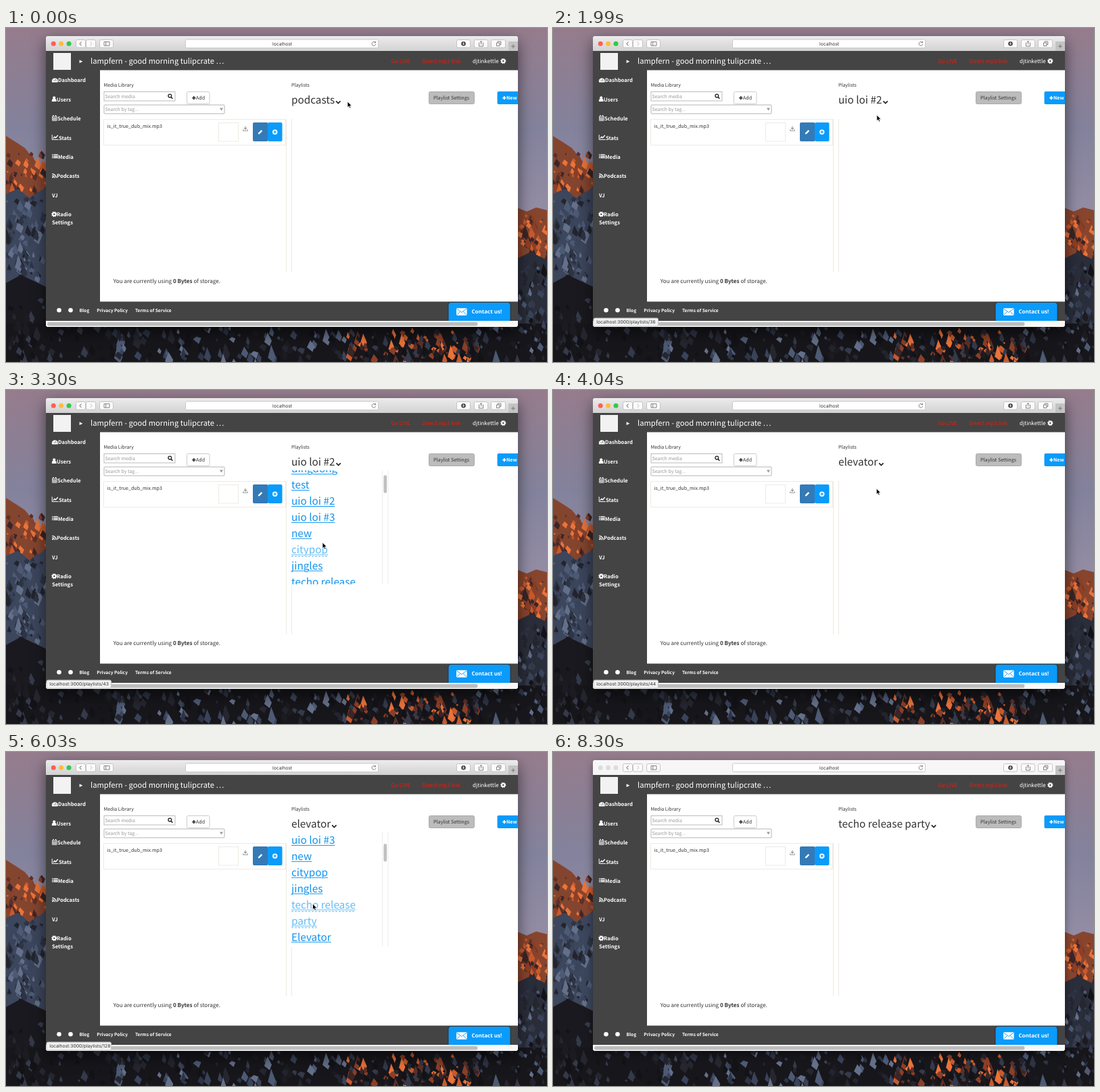
An HTML page for the animation above (8.4 s loop, 800 by 495 pixels).

```html
<!DOCTYPE html>
<html lang="en">
<head>
<meta charset="utf-8">
<title>Playlist picker</title>
<style>
html, body { margin: 0; width: 100%; height: 100%; overflow: hidden; background: #17161b; }
svg { display: block; width: 800px; height: 495px; }
text { font-family: "Noto Sans CJK JP", "Noto Sans CJK", "Noto Sans", sans-serif; text-rendering: geometricPrecision; white-space: pre; }
.ui { font-family: Inter, Roboto, sans-serif; }
.b { font-weight: 700; }
.chat { font-family: "Open Sans", sans-serif; font-weight: 700; }
</style>
</head>
<body>
<svg id="stage" viewBox="0 0 800 495" xmlns="http://www.w3.org/2000/svg"></svg>
<script>
const LOOP = 8400, ROW = 23.9, LEFT = 422, TOP = 119, BOTTOM = 288, BLUE = '#0a9bfb', DARK = '#444';
const LIGHTS = ['#fc605b', '#fdbc40', '#34c84a'];
const stage = document.getElementById('stage');

const rect = (x, y, w, h, fill, more = '') =>
  `<rect x="${x}" y="${y}" width="${w}" height="${h}" fill="${fill}" ${more}/>`;
const box = (x, y, w, h, fill, line, r = 0) =>
  rect(x + .5, y + .5, w - 1, h - 1, fill, `stroke="${line}" rx="${r}"`);
const text = (x, y, size, str, fill = '#333', cls = '') =>
  `<text x="${x}" y="${y}" font-size="${size}" fill="${fill}" class="${cls}">${str}</text>`;
const shape = (d, fill) => `<path d="${d}" fill="${fill}"/>`;
const line = (d, color, w = 1, more = '') =>
  `<path d="${d}" fill="none" stroke="${color}" stroke-width="${w}" ${more}/>`;
const dot = (x, y, r, fill, more = '') => `<circle cx="${x}" cy="${y}" r="${r}" fill="${fill}" ${more}/>`;
const plus = (x, y, color, r = 2.6) => line(`M${x - r} ${y}h${2 * r}M${x} ${y - r}v${2 * r}`, color, 1.7);
const gear = (x, y, color) =>
  dot(x, y, 2.2, 'none', `stroke="${color}" stroke-width="2"`) +
  dot(x, y, 3.4, 'none', `stroke="${color}" stroke-width="1.5" stroke-dasharray="1.34 1.33"`);

// Mountain backdrop: soft sky, flat slopes, seeded facets
let seed = 11;
const rnd = () => (seed = (seed * 16807) % 2147483647) / 2147483647;
function facets(n, x, y, w, h, colors, size) {
  let out = '';
  while (n--) {
    const s = size * (.4 + rnd()), lean = (rnd() - .3) * s;
    out += shape(`M${x + rnd() * w} ${y + rnd() * h}l${s * .4} ${lean + s * .4}l${-s * .2} ${s * .5}l${-s * .5} ${-s * .4}z`,
      colors[Math.floor(rnd() * colors.length)]);
  }
  return out;
}
const rock = ['#131217', '#1c1b21', '#25262f', '#343a4a'];
const snow = ['#4d5a74', '#64708a', '#39435a', '#23242d', '#2d3445'];
const glow = ['#c85a2c', '#ea733a', '#8c3f27', '#3a2527', '#5b3029'];
const backdrop = () =>
  rect(0, 0, 800, 495, 'url(#sky)') +
  shape('M0 160L16 170 28 178 42 196 60 208V495H0z', '#84452f') +
  facets(60, 0, 182, 60, 54, glow, 11) +
  shape('M0 246L18 238 34 252 60 236V495H0z', '#3c465c') +
  facets(90, 0, 246, 60, 120, snow, 12) +
  shape('M0 378L22 366 60 384V495H0z', '#1a191f') +
  shape('M755 266L770 272 784 266 800 270V495H755z', '#87452e') +
  facets(50, 757, 274, 45, 60, glow, 11) +
  shape('M755 342L776 332 800 344V495H755z', '#2a2e3a') +
  facets(50, 757, 340, 45, 90, [...rock, ...snow], 12) +
  rect(0, 438, 800, 57, '#17161b') +
  facets(70, 0, 400, 160, 90, rock, 13) +
  facets(120, 150, 440, 350, 50, [...rock, ...snow], 13) +
  facets(150, 505, 444, 195, 48, [...glow, ...rock], 12) +
  facets(50, 690, 430, 110, 58, [...rock, ...snow], 12);

const defs = `<defs>
<linearGradient id="sky" x2="0" y2="1"><stop stop-color="#957c8c"/><stop offset=".3" stop-color="#83829c"/>
<stop offset=".55" stop-color="#938ca4"/></linearGradient>
<linearGradient id="bar" x2="0" y2="1"><stop stop-color="#ececec"/><stop offset="1" stop-color="#d2d2d2"/></linearGradient>
<clipPath id="frame"><rect x="59" y="12" width="698" height="431" rx="4"/></clipPath>
<clipPath id="menuClip"><rect x="421" y="${TOP}" width="145" height="${BOTTOM - TOP}"/></clipPath>
</defs>`;

function toolbar() {
  const btn = (x, w) => box(x, 17, w, 12.5, '#fbfbfb', '#c4c4c4', 2);
  return rect(59, 12, 698, 22, 'url(#bar)', 'id="chrome"') +
    LIGHTS.map((c, i) => dot(70.2 + i * 11.4, 23.2, 3.5, c, 'class="light"')).join('') +
    btn(103, 15) + btn(118, 15) + btn(138, 21) + btn(666, 21) + btn(692, 21) + btn(717, 22) +
    line('M111.5 20.5l-2.5 2.8 2.5 2.8', '#555') + line('M124.5 20.5l2.5 2.8-2.5 2.8', '#bbb') +
    line('M145 20.5h8v5.6h-8zM147.7 20.5v5.6', '#666', .8) +
    dot(676.5, 23.2, 3.3, '#444') + line('M676.5 21v3.5m-1.4-1.3l1.4 1.5 1.4-1.5', '#fff', .8) +
    line('M700.5 22h-1v5h6v-5h-1M702.5 24.5v-5m-1.5 1.4l1.5-1.5 1.5 1.5', '#666', .8) +
    line('M725.5 22h4.5v4.5h-4.5zM727 21.5v-1.5h4.8v4.5h-1.4', '#666', .8) +
    box(265, 16.5, 286, 13.5, '#fff', '#c9c9c9', 2) + text(394, 25.8, 6.8, 'localhost', '#333', 'ui') +
    line('M546.2 21.5a2.9 2.9 0 1 0 .6 2.4M546.6 19.6v2.2h-2.2', '#666', .8) +
    rect(743, 20, 14, 14, '#c3c3c3') + line('M750 24.2v6M747 27.2h6', '#666', .8);
}

function header() {
  const red = '#f0190a', y = 52.2;
  return rect(59, 34, 698, 28.5, DARK) + rect(70, 37, 26, 25, '#f2f2f2') +
    shape('M108.6 47.3l4.8 2.4-4.8 2.4z', '#fff') +
    text(125, 53.2, 11.2, 'lampfern - good morning tulipcrate …', '#fff') +
    text(569.5, y, 8.05, 'Go LIVE', red) + text(615.5, y, 8.05, 'Direct mp3 link', red) +
    text(690, y, 8.05, 'djtinkettle', '#fff') + gear(735.3, 49, '#fff');
}

function sidebar() {
  const w = '#fff';
  const items = { Dashboard: 77, Users: 75, Schedule: 76, Stats: 78, Media: 77, Podcasts: 75, VJ: 68, Radio: 75 };
  return rect(59, 62, 80, 344, DARK) +
    Object.entries(items).map(([s, x], i) => text(x, 80.2 + i * 28.45, 7.65, s, w, 'b')).join('') +
    text(68, 290.6, 7.65, 'Settings', w, 'b') +
    shape('M68 80.5a4.6 4.6 0 1 1 8.6 0z', w) + line('M72 79l1.4-3.4M69.4 77.6h1m3.8 0h1', DARK, .8) +
    dot(71.2, 103.3, 2.1, w) + shape('M67.8 109v-1.6q0-2.4 2-2.4h2.8q2 0 2 2.4v1.6z', w) +
    line('M68.5 131h6.6v6.3h-6.6zM68.5 133h6.6M70.7 133v4.3M72.9 133v4.3M68.5 135.2h6.6', w, .8) + line('M70 129v2M73.6 129v2', w, 1.2) +
    line('M68.2 158.2v7.2h9.4', w) + line('M69.8 163.6l2-2.3 1.6 1.4 3.4-3.6', w, 1.4) +
    line('M68 187.6h1.4m.8 0h6.6M68 190h1.4m.8 0h6.6M68 192.3h1.4m.8 0h6.6', w, 1.4) +
    dot(69.2, 221.2, 1.1, w) + line('M68.2 218.6a3.6 3.6 0 0 1 3.6 3.6M68.2 216.2a6 6 0 0 1 6 6', w, 1.2) +
    gear(71.3, 276, w);
}

function footer() {
  const link = (x, s) => text(x, 421.2, 6.65, s, '#fff', 'b');
  return rect(59, 405.5, 698, 28.5, DARK) +
    dot(78.5, 418.3, 3.3, '#fff') + dot(95.5, 418.3, 3.3, '#fff') +
    link(108.5, 'Blog') + link(134.3, 'Privacy Policy') + link(191, 'Terms of Service') +
    rect(653, 406, 94, 32, '#222', 'rx="5" opacity=".35"') + rect(654.5, 407, 91, 30, BLUE, 'rx="4"') +
    rect(666, 415.3, 15.6, 10.6, '#fff', 'rx="1"') + line('M666.4 416l7.4 5.6 7.4-5.6M666.6 425.4l5-5m9.6 5l-5-5', BLUE, .9) +
    text(688.5, 423.4, 8, 'Contact us!', '#fff', 'chat') +
    rect(59, 434, 698, 9, '#f8f8f8') + rect(61, 436, 636.5, 5.4, '#bdbdbd', 'rx="2.7"');
}

function library() {
  const pale = '#efeae4';
  return text(144.5, 86.6, 7, 'Media Library') + text(LEFT, 86.6, 7, 'Playlists') +
    box(144.5, 94, 106, 14.5, '#fff', '#bbb') + text(146.5, 104, 7, 'Search media', '#999') +
    dot(242.3, 100.6, 2.4, 'none', 'stroke="#222" stroke-width="1.3"') + line('M244 102.4l2.4 2.4', '#222', 1.5) +
    box(267, 94, 34.5, 19, '#fff', '#ccc', 2) + plus(277.8, 103.6, '#333') + text(281, 106.2, 7.1, 'Add') +
    box(144.5, 113.5, 179, 14, '#fff', '#b4b4b4', 1) + text(146.5, 123.2, 7, 'Search by tag...', '#999') +
    shape('M316 118.4h5l-2.5 4.2z', '#999') +
    box(144, 135, 270, 39, '#fff', pale) + text(149.5, 148.4, 7.1, 'is_it_true_dub_mix.mp3') +
    box(314, 140, 30, 28.5, '#fff', pale) +
    line('M354 145.5v4.2m-2-1.8l2 2.2 2-2.2M350.8 150.2v2h6.4v-2', '#999', 1.1) +
    rect(365, 140, 22.5, 28, '#337ab7', 'rx="2"') + rect(387, 140, 21.5, 28, BLUE, 'rx="2"') +
    shape('M372.8 157.4l.5-2.2 4.2-4.2 1.7 1.7-4.2 4.2z', '#fff') +
    dot(397.7, 154.2, 3.7, '#fff') + line('M397.7 152v4.4M395.5 154.2h4.4', BLUE, 1.2) +
    line('M414.5 135v227M422.5 135v227', pale) +
    text(158.8, 377.6, 8.15, 'You are currently using <tspan class="b">0 Bytes</tspan> of storage.') +
    box(625, 94, 68, 19, '#bcbcbc', '#ababab', 2) + text(632, 106.2, 7.2, 'Playlist Settings') +
    rect(726.5, 94, 40, 19, BLUE, 'rx="2"') + plus(736.8, 103.6, '#fff') + text(740, 106.2, 7.1, 'New', '#fff', 'b');
}

// A slash marks where a long name wraps
const lists = 'podcasts,dingdong,test,uio loi #2,uio loi #3,new,citypop,jingles,techo release/party,Elevator'.split(',');
const ids = [12, 34, 35, 36, 41, 42, 43, 45, 128, 44];
const rows = lists.flatMap((name, item) => name.split('/').map(part => ({ part, item })));
const title = item => lists[item].replace('/', ' ').toLowerCase();
const baseline = i => 136.2 + i * ROW;

const menu = () => `<g id="menu">${rect(LEFT, TOP, 143.5, 170, '#fff')}
  <g clip-path="url(#menuClip)"><g id="rows">${rows.map((r, i) => `<g>
    <path class="under"/><path class="dash" stroke="#6dbdf5" stroke-dasharray="3 2"/>
    <text x="${LEFT}" y="${baseline(i)}" font-size="15.3" stroke="#fff" stroke-width="1.3" paint-order="stroke">${r.part}</text></g>`).join('')}</g></g>
  ${line('M556.5 119v169M565 119v169', '#ececec')}${rect(558.4, 120, 4.8, 26.5, '#c1c1c1', 'id="thumb" rx="2.4"')}</g>`;

const pointers =
  `<g id="arrow"><path d="M0 0V8.6L2 6.9 3.4 10 4.9 9.3 3.5 6.3H6.2z" fill="#000" stroke="#fff" stroke-width=".7"/></g>` +
  `<g id="hand"><path d="M1.2 .6q1-.9 1.7.3l.7 2.5 1-.3.9.5 1-.1.7.8.4 2.6-.7 2.6H2.7L-.6 5.6q0-1.2 1.2-.7l1 .8z" fill="#fff" stroke="#000" stroke-width=".8"/></g>`;

stage.innerHTML = defs + backdrop() +
  rect(59, 12, 698, 431, '#fff', 'rx="4" id="shade"') +
  `<g clip-path="url(#frame)">${rect(59, 12, 698, 431, '#fff')}${toolbar()}${header()}${sidebar()}${library()}${footer()}
   ${text(LEFT, 112.2, 15.3, '', '#333', 'head')}${line('M-3.2 -1.6L0 1.6 3.2 -1.6', '#222', 1.7, 'id="caret"')}${menu()}
   <g id="status">${box(59.5, 429.5, 96.5, 13, '#f1f1f1', '#c4c4c4', 2)}${text(64.3, 438.3, 6.8, '', '#333', 'ui url')}</g></g>${pointers}`;

const $ = q => stage.querySelector(q);
const show = (el, on) => el.setAttribute('display', on ? 'inline' : 'none');
const move = (el, x, y) => el.setAttribute('transform', `translate(${x} ${y})`);
const ramp = (t, a, b) => Math.min(1, Math.max(0, (t - a) / (b - a)));
const ease = u => u * u * (3 - 2 * u);

const bursts = [[0, 0], [170, 170], [470, 470], [800, 800], [1100, 1990], [2200, 3090],
  [3300, 4190], [4360, 5230], [5440, 6420], [6630, 7220]];
function snap(t) {
  const [a, b] = bursts.findLast(([from]) => from <= t);
  const step = (b - a) / Math.round((b - a) / 190) || 1;
  return Math.min(b, a + Math.floor((t - a + 15) / step) * step);
}

// Each visit: menu opens, optional scroll span, an item is picked
const visits = [
  { open: 800, pick: 1800, item: 3 },
  { open: 2370, pick: 3830, item: 9, scroll: [3150, 3500] },
  { open: 4530, pick: 6410, item: 8, scroll: [5300, 6020] }
];
// Cursor way points: time, x, y
const path = [[0, 505, 109], [170, 495.5, 112], [470, 489, 110], [800, 489, 110], [1460, 474, 200], [1640, 475, 202],
  [1990, 478.8, 129], [2200, 488, 112], [2378, 488, 112], [2912, 472.8, 223], [3300, 468, 226], [3656, 466, 270],
  [4012, 478.3, 146], [4360, 484, 111], [4534, 484, 112], [4880, 464, 216], [5056, 461, 217], [5440, 453.5, 225],
  [6420, 453.5, 225], [7030, 702, 116]];
function cursor(t) {
  const i = path.findLastIndex(p => p[0] <= t), a = path[i], b = path[i + 1] || a;
  const u = a === b ? 0 : ease(ramp(t, a[0], b[0]));
  return [a[1] + (b[1] - a[1]) * u, a[2] + (b[2] - a[2]) * u];
}

function stateAt(t) {
  const visit = visits.findLast(v => v.open <= t);
  const picked = visits.findLast(v => v.pick <= t);
  const open = !!visit && t < visit.pick;
  const scroll = open && visit.scroll ? 4 * ease(ramp(t, ...visit.scroll)) : 0;
  const [x, y] = cursor(t);
  const row = open && y > TOP && y < BOTTOM ? rows[Math.floor((y - TOP) / ROW + scroll)] : null;
  const hover = row ? row.item : -1;
  const alpha = open ? (row ? ramp(t, visit.open + 300, visit.open + 700) : 0)
    : picked ? 1 - ramp(t, picked.pick + 300, picked.pick + 550) : 0;
  const head = picked ? picked.item : 0;
  return { open, scroll, x, y, hover, alpha, head, link: row ? hover : head };
}

function paintMenu({ open, scroll, hover }) {
  show($('#menu'), open);
  if (!open) return;
  move($('#rows'), 0, -scroll * ROW);
  $('#thumb').setAttribute('y', 120 + scroll * 4);
  [...$('#rows').children].forEach((g, i) => {
    const hot = rows[i].item === hover, color = hot ? '#62bdf6' : '#1094ee';
    const [under, dash, label] = g.children;
    const d = dy => `M${LEFT} ${baseline(i) + dy}h${label.getComputedTextLength()}`;
    label.setAttribute('fill', color);
    under.setAttribute('stroke', color);
    under.setAttribute('d', d(2.2));
    dash.setAttribute('d', d(4.6));
    show(dash, hot);
  });
}

function paint(t, idle) {
  const s = stateAt(t), head = $('.head');
  // The pointer shape lags one step behind the hover
  const hand = s.hover >= 0 && stateAt(t - 170).hover === s.hover;
  head.textContent = title(s.head);
  move($('#caret'), LEFT + head.getComputedTextLength() + 5.2, 110);
  paintMenu(s);
  $('.url').textContent = 'localhost:3000/playlists/' + ids[s.link];
  $('#status').setAttribute('opacity', s.alpha);
  const gone = t > 7200;
  show($('#arrow'), !hand && !gone);
  show($('#hand'), hand && !gone);
  move($(hand ? '#hand' : '#arrow'), s.x, s.y);
  $('#chrome').setAttribute('fill', idle ? '#f6f6f6' : 'url(#bar)');
  stage.querySelectorAll('.light').forEach((l, i) => l.setAttribute('fill', idle ? '#dcdcdc' : LIGHTS[i]));
  $('#shade').style.filter = idle ? 'drop-shadow(0 4px 6px rgba(0,0,0,.4))' : 'drop-shadow(0 8px 11px rgba(0,0,0,.55))';
}

let last = '';
const start = performance.now();
function tick() {
  const now = Math.max(0, performance.now() - start) % LOOP;
  const t = snap(now), idle = now >= 8300, key = t + ':' + idle;
  if (key !== last) paint(t, idle);
  last = key;
  requestAnimationFrame(tick);
}
tick();
</script>
</body>
</html>
```
